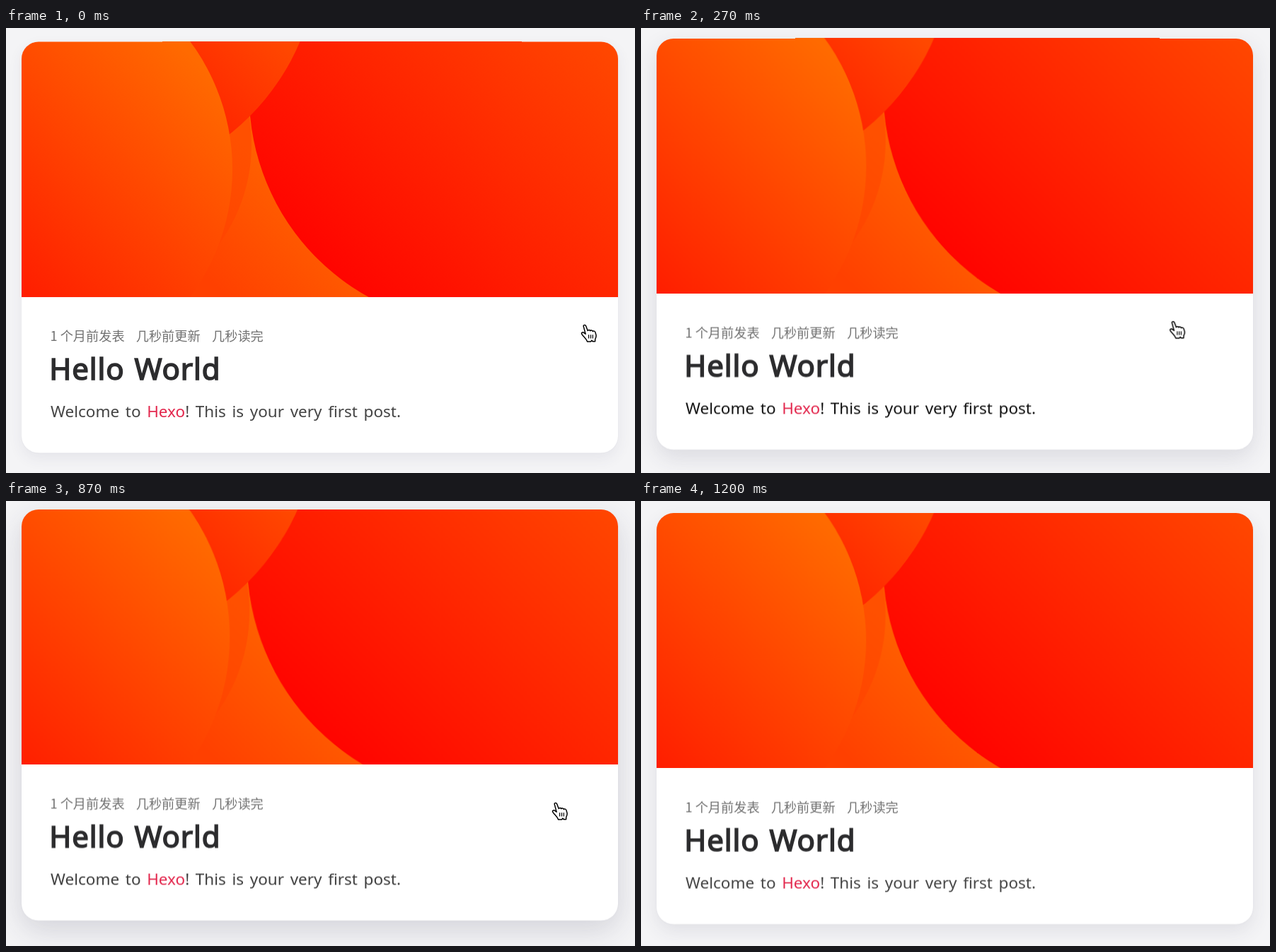
An HTML page that plays this animation: 889 px wide and 630 px high, repeating every 1.27 s.

```html
<!DOCTYPE html>
<html lang="zh">
<head>
<meta charset="utf-8">
<title>Post card</title>
<style>
  html, body { margin: 0; width: 100%; height: 100%; overflow: hidden; background: #f4f4f6; }

  .card, .zoom, .body, .cursor { animation: 2000ms linear both paused; }
  .card {
    position: absolute; left: 22px; top: 12px; width: 843px; height: 582px;
    border-radius: 24px; overflow: hidden; background: #fff;
    will-change: transform;
    animation-name: lift;
  }
  .card svg { display: block; }
  .zoom { transform-origin: 443.5px 200px; animation-name: zoom; }
  .body { animation-name: ink; }
  .cursor { position: absolute; left: 0; top: 0; animation-name: point; }

  /* hover in at 50 ms, hover out at 955 ms */
  @keyframes lift {
    0%, 2.5%, 65.75%, 100% {
      transform: translateY(7.5px);
      box-shadow: 0 0 2px rgba(40, 40, 70, .06), 0 8px 20px rgba(60, 60, 100, .08);
    }
    2.5%, 47.75% { animation-timing-function: ease; }
    20.5%, 47.75% {
      transform: translateY(0);
      box-shadow: 0 0 2px rgba(40, 40, 70, .06), 0 14px 40px rgba(50, 50, 75, .17);
    }
  }
  @keyframes zoom {
    0%, 2.5%, 72.25%, 100% { transform: scale(1); }
    2.5%, 47.75% { animation-timing-function: ease; }
    26%, 47.75% { transform: scale(1.03); }
  }
  @keyframes ink {
    0%, 2.5%, 47.75% { animation-timing-function: step-end; }
    0%, 47.75%, 100% { fill: #444; }
    2.5% { fill: #000; }
  }
  @keyframes point {
    0%, 3.2%, 6.5%, 9.8%, 13%, 43%, 46.5% { animation-timing-function: step-end; }
    0% { transform: translate(812px, 419px); visibility: visible; }
    3.2% { transform: translate(779px, 416.5px); }
    6.5% { transform: translate(751px, 415px); }
    9.8% { transform: translate(747px, 414px); }
    13% { transform: translate(746px, 414px); }
    43% { transform: translate(771px, 426px); visibility: visible; }
    46.5%, 100% { transform: translate(771px, 426px); visibility: hidden; }
  }

  text { font-family: "Noto Sans", "Open Sans", sans-serif; white-space: pre; }
  .meta text { font: 18.2px "Noto Sans CJK SC", "Noto Sans CJK", sans-serif; fill: #717171; }
  .title {
    font-size: 42px; letter-spacing: .9px; word-spacing: 2px;
    fill: #2c2c2e; stroke: #2c2c2e; stroke-width: 1.6px;
  }
  .body { font-size: 22.5px; word-spacing: 2.8px; }
  .link { fill: #e3274d; }
</style>
</head>
<body>
<div class="card">
  <svg width="843" height="582" viewBox="22 19.5 843 582">
    <defs>
      <clipPath id="cover"><rect x="21" y="19" width="846" height="361.5"/></clipPath>
      <linearGradient id="base" gradientUnits="userSpaceOnUse" x1="300" y1="370" x2="422" y2="248">
        <stop stop-color="#ff4000"/><stop offset="1" stop-color="#ff5f00"/>
      </linearGradient>
      <linearGradient id="band" gradientUnits="userSpaceOnUse" x1="290" y1="320" x2="390" y2="220">
        <stop stop-color="#ff4300"/><stop offset="1" stop-color="#ff5000"/>
      </linearGradient>
      <linearGradient id="red" gradientUnits="userSpaceOnUse" x1="470" y1="380" x2="842" y2="8">
        <stop stop-color="#ff0200"/><stop offset="1" stop-color="#ff4800"/>
      </linearGradient>
      <linearGradient id="top" gradientUnits="userSpaceOnUse" x1="316" y1="145" x2="418" y2="43">
        <stop stop-color="#ff2800"/><stop offset="1" stop-color="#ff4800"/>
      </linearGradient>
      <linearGradient id="left" gradientUnits="userSpaceOnUse" x1="25" y1="375" x2="312" y2="88">
        <stop stop-color="#ff1e00"/><stop offset="1" stop-color="#ff6a00"/>
      </linearGradient>
    </defs>
    <g clip-path="url(#cover)">
      <g class="zoom">
        <rect x="0" y="0" width="889" height="400" fill="url(#base)"/>
        <circle cx="107" cy="165" r="240" fill="url(#band)"/>
        <path d="M671-232.7A327.3 327.3 0 0 0 671 421.9H900V-232.7Z" fill="url(#red)"/>
        <circle cx="108" cy="-111" r="334" fill="url(#top)"/>
        <circle cx="16" cy="200" r="304" fill="url(#left)"/>
      </g>
    </g>
    <g class="meta">
      <text x="62.5" y="442.5">1 个月前发表</text>
      <text x="183.7" y="442.5">几秒前更新</text>
      <text x="291" y="442.5">几秒读完</text>
    </g>
    <text class="title" x="61.2" y="497.5">Hello World</text>
    <text class="body" x="63" y="551">Welcome to <tspan class="link">Hexo</tspan>! This is your very first post.</text>
  </svg>
</div>
<svg class="cursor" width="26" height="28" viewBox="0 0 26 28">
  <path d="M4.3 3.6C3.6 1.4 6.7.5 7.6 2.7L10.2 9.6C10.6 8 13.3 8 13.8 9.8 14.4 8.4 16.9 8.7 17.3 10.6 18.2 9.5 20.6 10 21 12L22 15.6C22.5 18 21.8 19.6 20.7 21.6L20.6 24.8H17.2L16 23.2 14.4 25H9.6C8.6 21.6 5.4 18.8 2.2 15 .4 12.4 3 10.8 5 12.6L7.1 14.2Z"
    fill="#fff" stroke="#000" stroke-width="1.5" stroke-linejoin="round"/>
  <path d="M11.6 15.2V20.4M14.5 15.2V20.4M17.3 15.2V20.4" stroke="#000" stroke-width="1.2"/>
</svg>
<script>
  const LOOP = 1270, STEP = 1000 / 15, LAST = 18;
  const parts = document.getAnimations();
  const start = performance.now();

  // The picture advances at 15 steps per second and holds in between.
  function draw() {
    const t = (performance.now() - start) % LOOP;
    const step = Math.min(LAST, Math.floor((t + 3.5) / STEP));
    for (const part of parts) part.currentTime = step * STEP;
    requestAnimationFrame(draw);
  }
  draw();
</script>
</body>
</html>
```
